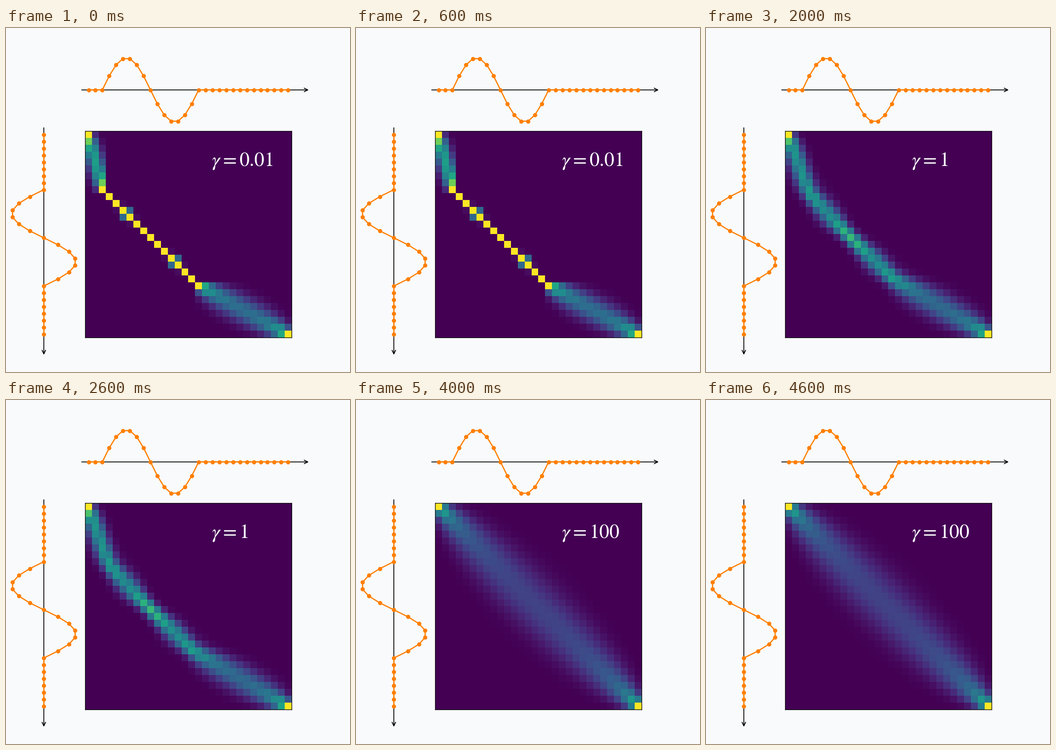
Write a matplotlib script that moves like this. It is 748x748 px and loops after 5000 ms.

```python
import numpy as np
import matplotlib.pyplot as plt
from matplotlib.animation import FuncAnimation
from matplotlib.patches import FancyArrowPatch

plt.rcParams["mathtext.fontset"] = "stix"

SIZE = 748
N = 30
GAMMAS = [0.01, 0.1, 1, 10, 100]
BG, ORANGE = "#f9fafc", "#ff7f00"

LEFT, TOP, SIDE = 0.23 * SIZE, 0.3 * SIZE, 0.6 * SIZE
CELL = SIDE / N
BASE_X, BASE_Y = 0.11 * SIZE, 0.18 * SIZE


def wave(start, length=14):
    """One sine period starting at `start`, zero elsewhere."""
    t = np.arange(N) - start
    inside = (t >= 0) & (t <= length)
    return np.where(inside, np.sin(2 * np.pi * t / length), 0)


def log_sums(score):
    """Log of the summed weights of all warping paths reaching each cell."""
    acc = np.full((N + 1, N + 1), -np.inf)
    acc[0, 0] = 0
    for i in range(N):
        for j in range(N):
            prev = [acc[i, j], acc[i, j + 1], acc[i + 1, j]]
            acc[i + 1, j + 1] = score[i, j] + np.logaddexp.reduce(prev)
    return acc[1:, 1:]


def soft_alignment(cost, gamma):
    """Expected soft-DTW alignment matrix."""
    score = -cost / gamma
    fwd = log_sums(score)
    bwd = log_sums(score[::-1, ::-1])[::-1, ::-1]
    return np.exp(fwd + bwd - score - fwd[-1, -1])


rows, cols = wave(8), wave(2)
cost = (rows[:, None] - cols[None, :]) ** 2
maps = [soft_alignment(cost, g) for g in GAMMAS]

fig = plt.figure(figsize=(8, 8), dpi=SIZE / 8, facecolor=BG)
stage = fig.add_axes([0, 0, 1, 1])
stage.set(xlim=(0, SIZE), ylim=(SIZE, 0))
stage.axis("off")


def arrow(start, end):
    stage.add_patch(FancyArrowPatch(
        start, end, arrowstyle="->", mutation_scale=15, lw=1.4,
        color="black", shrinkA=0, shrinkB=0, zorder=1))


def series(x, y):
    stage.plot(x, y, "o-", color=ORANGE, lw=2, ms=6, zorder=2)


steps = (np.arange(N) + 0.5) * CELL
amp = 0.1 * SIZE / (1.1 * cols.max())

arrow((LEFT - CELL / 2, BASE_Y), (LEFT + 32.5 * CELL, BASE_Y))
arrow((BASE_X, TOP - CELL / 2), (BASE_X, TOP + 32.5 * CELL))
series(LEFT + steps, BASE_Y - amp * cols)
series(BASE_X - amp * rows, TOP + steps)

grid = fig.add_axes([0.23, 0.1, 0.6, 0.6])
grid.set(xticks=[], yticks=[])
image = grid.imshow(maps[0], cmap="viridis", vmin=0, vmax=1,
                    interpolation="nearest", aspect="auto")
for spine in grid.spines.values():
    spine.set_linewidth(1)

label = grid.text((447.5 - LEFT) / SIDE, 1 - (299.7 - TOP) / SIDE, "",
                  transform=grid.transAxes, color="white", fontsize=33.5,
                  ha="left", va="baseline")


def update(k):
    image.set_data(maps[k])
    label.set_text(rf"$\gamma = {GAMMAS[k]:g}$")
    return image, label


anim = FuncAnimation(fig, update, frames=len(GAMMAS), interval=1000,
                     repeat=True, repeat_delay=0)
plt.show()
```
